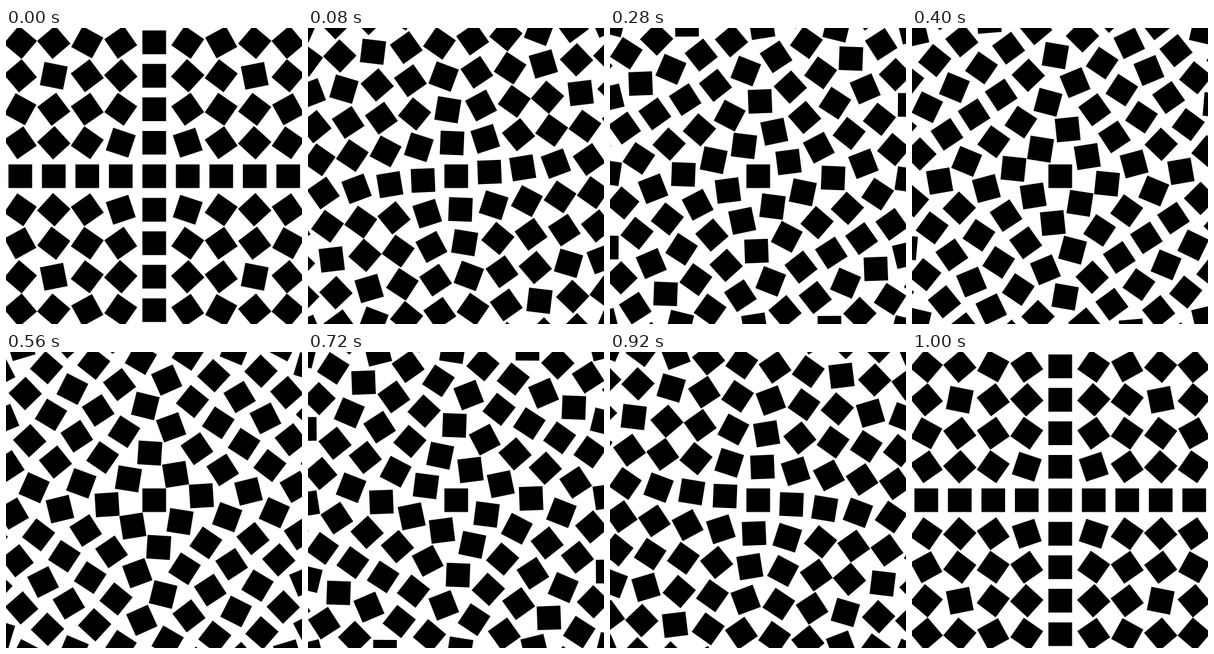
Write an HTML page that moves like this. It is 480 px wide and 480 px high and loops after 1020 ms.

```html
<!DOCTYPE html>
<html lang="en">
<head>
<meta charset="utf-8">
<title>Turning squares</title>
<style>
  html, body { margin: 0; width: 100%; height: 100%; overflow: hidden; background: #fff; }
  svg { display: block; width: 100vw; height: 100vh; }
</style>
</head>
<body>
<svg viewBox="0 0 480 480"><path id="squares" fill="#000"/></svg>
<script>
const STEP_MS = 20, STEPS = 50;
const CENTER = 240.4, SIDE = 38.4, PITCH = SIDE * Math.SQRT2;
const REACH = 7;
const SWING = 1;       // largest tilt, in radians
const TWIST = 0.327;   // how fast the tilt varies with x * y, in grid units

const path = document.getElementById('squares');

function square(x, y, angle) {
  const c = SIDE / 2 * Math.cos(angle), s = SIDE / 2 * Math.sin(angle);
  const corners = [[-c + s, -s - c], [c + s, s - c], [c - s, s + c], [-c - s, -s + c]];
  return 'M' + corners.map(([dx, dy]) => `${(x + dx).toFixed(2)} ${(y + dy).toFixed(2)}`).join('L') + 'Z';
}

// The grid makes a quarter turn per loop; each square's tilt depends only on where it is.
function render(ms) {
  const step = Math.floor(ms / STEP_MS) % (STEPS + 1);
  const turn = -Math.PI / 2 * (step % STEPS) / STEPS;
  const c = Math.cos(turn), s = Math.sin(turn);
  let d = '';
  for (let i = -REACH; i <= REACH; i++) {
    for (let j = -REACH; j <= REACH; j++) {
      const x = i * c - j * s, y = i * s + j * c;
      d += square(CENTER + x * PITCH, CENTER + y * PITCH, SWING * Math.sin(TWIST * x * y));
    }
  }
  path.setAttribute('d', d);
}

const start = performance.now();
function tick() {
  render(performance.now() - start);
  requestAnimationFrame(tick);
}
tick();
</script>
</body>
</html>
```
